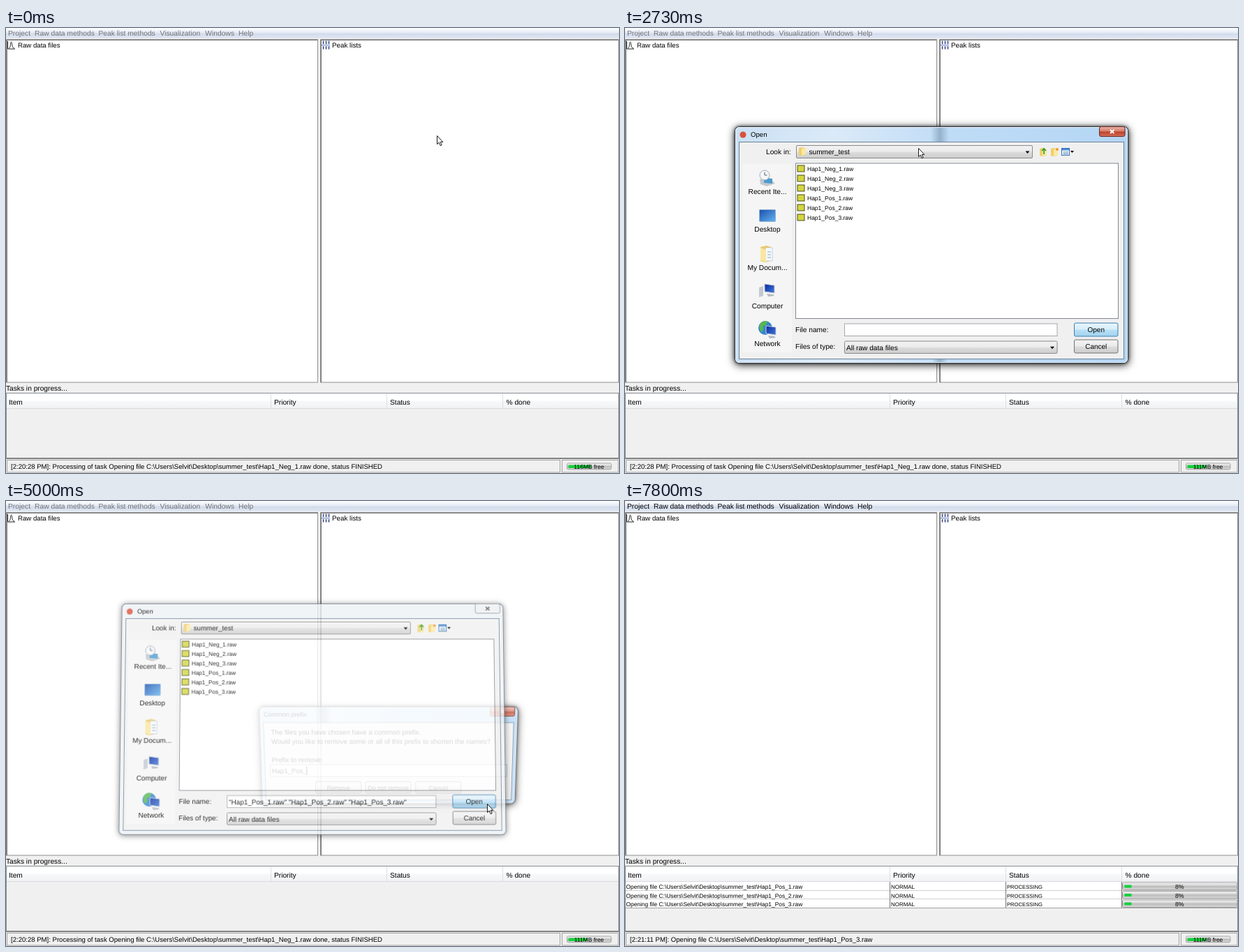
Animation, 878 px wide and 638 px high, one loop 8 s. Source, as an HTML page:

```html
<!DOCTYPE html>
<html lang="en">
<head>
<meta charset="utf-8">
<title>Importing raw data</title>
<style>
html, body { margin: 0; width: 100%; height: 100%; overflow: hidden; background: #f0f0f0; }
#stage { position: absolute; inset: 0; overflow: hidden; contain: strict; }
svg { position: absolute; left: 0; top: 0; width: 878px; height: 638px; display: block; }
text { font-family: "Liberation Sans", Arial, sans-serif; white-space: pre; text-rendering: geometricPrecision; }
.mid { text-anchor: middle; }
.frame { filter: drop-shadow(0 0 2px rgba(0,0,0,.6)) drop-shadow(0 2px 6px rgba(0,0,0,.8)); }

/* Hard switches: shared clock, one keyframe set each */
.sw, #open .frame { animation: 8s step-end infinite; }
#open .frame { animation-name: unlit; }
.ink { animation-name: ink; }
.menu { animation-name: menu; }
.hover { animation-name: hover; }
.selA { animation-name: selA; }
.selB { animation-name: selB; }
.one { animation-name: one; }
.many { animation-name: many; }
.caretA { animation-name: caretA; }
.caretB { animation-name: caretB; }
.inactive { animation-name: inactive; }
.before { animation-name: before; }
.after { animation-name: after; }
.p0 { animation-name: p0; }
.p4 { animation-name: p4; }
.p8 { animation-name: p8; }
.m116 { animation-name: m116; }
.m114 { animation-name: m114; }
.m111 { animation-name: m111; }
.m110 { animation-name: m110; }
@keyframes unlit { 61.625% { filter: drop-shadow(0 1px 4px rgba(0,0,0,.6)) } 100% { filter: drop-shadow(0 1px 4px rgba(0,0,0,.6)) } }
@keyframes ink { 0% { fill: #737376 } 10.875% { fill: #000 } 21.625% { fill: #737376 } 81.625% { fill: #000 } }
@keyframes menu { 0% { opacity: 0 } 10.875% { opacity: 1 } 21.625% { opacity: 0 } }
@keyframes hover { 0% { opacity: 0 } 16.75% { opacity: 1 } 21.625% { opacity: 0 } }
@keyframes selA { 0% { opacity: 0 } 39.125% { opacity: 1 } 61.625% { opacity: 0 } }
@keyframes selB { 0% { opacity: 0 } 44.125% { opacity: 1 } 61.625% { opacity: 0 } }
@keyframes one { 0% { opacity: 0 } 39.125% { opacity: 1 } 44.125% { opacity: 0 } }
@keyframes many { 0% { opacity: 0 } 44.125% { opacity: 1 } }
@keyframes caretA { 0% { opacity: 1 } 30.625% { opacity: 0 } 36.875% { opacity: 1 } 39.125% { opacity: 0 } }
@keyframes caretB { 0% { opacity: 1 } 68.75% { opacity: 0 } 75% { opacity: 1 } }
@keyframes inactive { 0% { opacity: 0 } 61.625% { opacity: 1 } }
@keyframes before { 0% { opacity: 1 } 81.625% { opacity: 0 } }
@keyframes after { 0% { opacity: 0 } 81.625% { opacity: 1 } }
@keyframes p0 { 0% { opacity: 1 } 93.375% { opacity: 0 } }
@keyframes p4 { 0% { opacity: 0 } 93.375% { opacity: 1 } 96.625% { opacity: 0 } }
@keyframes p8 { 0% { opacity: 0 } 96.625% { opacity: 1 } }
@keyframes m116 { 0% { opacity: 1 } 23.375% { opacity: 0 } }
@keyframes m114 { 0% { opacity: 0 } 23.375% { opacity: 1 } 29.125% { opacity: 0 } }
@keyframes m111 { 0% { opacity: 0 } 29.125% { opacity: 1 } 74.625% { opacity: 0 } 96.625% { opacity: 1 } }
@keyframes m110 { 0% { opacity: 0 } 74.625% { opacity: 1 } 96.625% { opacity: 0 } }

/* Windows swing in and out */
#open { transform-origin: 439px 311px; animation: open 8s linear infinite; }
@keyframes open {
  0%, 23.75% { opacity: 0; transform: perspective(1000px) translateY(0) scale(.95) rotateX(0deg); }
  25% { opacity: .96; transform: perspective(1000px) translateY(-.5px) scale(.985) rotateX(0deg); }
  26.625%, 61.625% { opacity: 1; transform: perspective(1000px) translateY(0) scale(1) rotateX(0deg); }
  62.5% { opacity: .8; transform: perspective(1000px) translateY(.5px) scale(.977) rotateX(2.7deg); }
  65%, 100% { opacity: 0; transform: perspective(1000px) translateY(2px) scale(.915) rotateX(8deg); }
}
#prefix { transform-origin: 548px 367px; animation: prefix 8s linear infinite; }
@keyframes prefix {
  0%, 61.625% { opacity: 0; transform: perspective(1000px) translateY(-3px) scale(.92) rotateX(-16deg); }
  62.5% { opacity: .75; transform: perspective(1000px) translateY(-2px) scale(.952) rotateX(-10deg); }
  64.125%, 80.875% { opacity: 1; transform: perspective(1000px) translateY(0) scale(1) rotateX(0deg); }
  83.75%, 100% { opacity: 0; transform: perspective(1000px) translateY(2px) scale(.915) rotateX(8deg); }
}
.haze { animation: haze 8s linear infinite; }
@keyframes haze { 0%, 24% { opacity: .4 } 25% { opacity: .28 } 26.625%, 100% { opacity: 0 } }

#cursor { width: 10px; height: 16px; animation: travel 8s cubic-bezier(.4,.1,.6,.9) infinite, leave 8s step-end infinite; }
@keyframes leave { 0% { opacity: 1 } 90% { opacity: 0 } }
@keyframes travel {
  0%, .8% { transform: translate(617px,154px); }
  8.375%, 13.375% { transform: translate(84px,7px); }
  19.125%, 25.875% { transform: translate(83px,24px); }
  34.125%, 35% { transform: translate(420px,172px); }
  38.375%, 40.875% { transform: translate(290px,238px); }
  44.125%, 45.875% { transform: translate(281px,274px); }
  55.875%, 59.5% { transform: translate(751px,449px); }
  61.625%, 68.375% { transform: translate(689px,434px); }
  77.5%, 79.125% { transform: translate(529px,432px); }
  80.875%, 86.625% { transform: translate(533px,418px); }
  89.125%, 100% { transform: translate(464px,589px); }
}
</style>
</head>
<body>
<div id="stage">
<svg id="main">
  <defs>
    <linearGradient id="bar" x2="0" y2="1"><stop stop-color="#fff"/><stop offset=".45" stop-color="#e4eaf5"/><stop offset=".55" stop-color="#d3dbeb"/><stop offset="1" stop-color="#e0e7f3"/></linearGradient>
    <linearGradient id="head" x2="0" y2="1"><stop stop-color="#fff"/><stop offset=".45" stop-color="#fff"/><stop offset=".55" stop-color="#f7f8fa"/><stop offset="1" stop-color="#f1f2f4"/></linearGradient>
    <linearGradient id="grey" x2="0" y2="1"><stop stop-color="#f3f3f3"/><stop offset=".49" stop-color="#ebebeb"/><stop offset=".51" stop-color="#dddddd"/><stop offset="1" stop-color="#cdcdcd"/></linearGradient>
    <linearGradient id="blue" x2="0" y2="1"><stop stop-color="#eaf6fd"/><stop offset=".49" stop-color="#d5edfb"/><stop offset=".51" stop-color="#b8e0f6"/><stop offset="1" stop-color="#a2d2ee"/></linearGradient>
    <linearGradient id="track" x2="0" y2="1"><stop stop-color="#f4f4f4"/><stop offset=".4" stop-color="#d6d6d6"/><stop offset=".5" stop-color="#bcbcbc"/><stop offset="1" stop-color="#d8d8d8"/></linearGradient>
    <linearGradient id="red" x2="0" y2="1"><stop stop-color="#e9b3a6"/><stop offset=".48" stop-color="#d67b69"/><stop offset=".52" stop-color="#bd3e29"/><stop offset="1" stop-color="#d2705a"/></linearGradient>
    <linearGradient id="glass"><stop stop-color="#cbe0f5"/><stop offset=".25" stop-color="#dbeaf8"/><stop offset=".55" stop-color="#bfdcf6"/><stop offset="1" stop-color="#b4d6f5"/></linearGradient>
    <linearGradient id="smear"><stop stop-color="#6f8ca8" stop-opacity="0"/><stop offset=".5" stop-color="#6f8ca8" stop-opacity=".55"/><stop offset="1" stop-color="#6f8ca8" stop-opacity="0"/></linearGradient>
    <linearGradient id="screen" x2="1" y2="1"><stop stop-color="#1c4fae"/><stop offset="1" stop-color="#63b4ef"/></linearGradient>
    <linearGradient id="night" x2="1" y2="1"><stop stop-color="#0a2a9c"/><stop offset="1" stop-color="#3f78dc"/></linearGradient>
    <g id="folder"><path d="M0 1 4 0 9 1V11L4 12 0 11Z" fill="#f0cf6c"/><path d="M4 2 10 1V10L4 12Z" fill="#fae9a4"/></g>
    <rect id="file" width="10" height="9" fill="#d3d640" stroke="#4a4d18"/>
  </defs>
</svg>
<svg id="prefix"></svg>
<svg id="open"></svg>
<svg id="cursor"><path d="M.5.5V12.6L3.2 10.1 5.2 14.7 7.1 13.8 5.2 9.4H8.8Z" fill="#fff" stroke="#000" stroke-width=".9"/></svg>
</div>

<script>
const rect = (x, y, w, h, fill, stroke = 'none', r = 0) =>
  `<rect x="${x}" y="${y}" width="${w}" height="${h}" fill="${fill}" stroke="${stroke}" rx="${r}"/>`;
const line = (d, color = '#888', w = 1) => `<path d="${d}" fill="none" stroke="${color}" stroke-width="${w}"/>`;
const text = (x, y, s, size = 10.2, attrs = '') => `<text x="${x}" y="${y}" font-size="${size}" ${attrs}>${s}</text>`;
const mid = (x, y, s, size) => text(x, y, s, size, 'class="mid"');
const sw = (name, inner) => `<g class="sw ${name}">${inner}</g>`;
const use = (id, x, y) => `<use href="#${id}" x="${x}" y="${y}"/>`;
const draw = (id, parts) => document.getElementById(id).insertAdjacentHTML('beforeend', parts.join(''));
const button = (x, y, w, h, label, size, hot) =>
  rect(x, y, w, h, hot ? 'url(#blue)' : 'url(#grey)', hot ? '#3c7fb1' : '#707070', 2) +
  mid(x + w / 2, y + h / 2 + 3.6, label, size);
const combo = (x, y, w, h) => rect(x, y, w, h, 'url(#grey)', '#8a8a8a', 1.5) +
  `<path d="M${x + w - 10} ${y + h / 2 - 1}h6l-3 3.5z"/>`;

const dir = 'C:\\Users\\Selvit\\Desktop\\summer_test\\';
const raw = (kind, n) => `Hap1_${kind}_${n}.raw`;

// Main window
const menus = [[3, 'Project'], [41, 'Raw data methods'], [132.5, 'Peak list methods'],
  [220.5, 'Visualization'], [285.3, 'Windows'], [333, 'Help']];
const items = ['Raw data import', 'Raw data export', 'Order raw data files', 'Filtering', 'Peak detection'];
const columns = [[4, 'Item'], [384, 'Priority'], [550, 'Status'], [716.5, '% done']];

// Sunken pane: pale outer edge, dark inner edge
const panel = (x, w) => rect(x + .5, 16.5, w, 491.5, '#fff', '#8f8f8f') +
  line(`M${x + 1.3} 508V17.2H${x + w}`, '#626262');

const taskRow = i => {
  const y = 546 + i * 12.5;
  return rect(1, y, 876, 12.5, '#fff') + line(`M1 ${y + 12.5}H877`, '#a0a0a0') +
    text(1.5, y + 10, `Opening file ${dir}${raw('Pos', i + 1)}`, 8.4) +
    text(381, y + 10, 'NORMAL', 7.95) + text(547, y + 10, 'PROCESSING', 7.65) +
    rect(712.5, y + 1, 164.5, 10.5, 'url(#track)', '#a2a2a2', 2) +
    sw('p8', rect(715.5, y + 4.5, 10, 4, '#12d23a')) +
    [0, 4, 8].map(p => sw('p' + p, text(788, y + 10, p + '%', 8.7))).join('');
};

const memory = n => sw('m' + n,
  rect(805.5, 626.5, n - 84, 4.5, '#18cf3c') + mid(835, 631.8, n + 'MB free', 8.5));

draw('main', [
  rect(0, 0, 878, 638, '#f0f0f0'),
  rect(0, 0, 878, 15, 'url(#bar)'),
  sw('menu', rect(39.5, 1.5, 88.5, 12.5, '#d9dfea', '#555', 2)),
  sw('ink', menus.map(([x, s]) => text(x, 11, s, 10.3)).join('')),
  panel(0, 446), panel(450, 427),
  line('M2.5 19V30H13', '#222'), line('M4 29C7 29 6 20 7.5 20S8 29 12 29', '#222'),
  text(17, 28.2, 'Raw data files', 9.65),
  line('M452 24.5H464', '#5f7fd0'),
  line('M454.5 18.5V23M458.5 18.5V23M462.5 18.5V23M454.5 26V30.5M458.5 26V30.5M462.5 26V30.5', '#2b3b78', 1.4),
  text(467, 28.2, 'Peak lists', 9.8),
  text(0, 520.4, 'Tasks in progress...'),
  rect(.5, 523.5, 877, 93, '#f0f0f0', '#8a8e94'),
  rect(1, 524, 876, 21, 'url(#head)'), line('M1 545.5H877', '#d8dade'),
  line('M379.5 524V545M545.5 524V545M711.5 524V545', '#dddfe3'),
  columns.map(([x, s]) => text(x, 539.8, s)).join(''),
  sw('after', [0, 1, 2].map(taskRow).join('') + line('M379.5 546V583M545.5 546V583M711.5 546V583', '#777')),
  line('M0 617.5H878', '#777'),
  rect(1.5, 619.5, 792, 17.5, '#f0f0f0', '#a3a3a3'), rect(796.5, 619.5, 80.5, 17.5, '#f0f0f0', '#a3a3a3'),
  sw('before', text(7, 632, `[2:20:28 PM]: Processing of task Opening file ${dir}${raw('Neg', 1)} done, status FINISHED`, 9.57)),
  sw('after', text(7, 632, `[2:21:11 PM]: Opening file ${dir}${raw('Pos', 3)}`, 9.57)),
  rect(803.5, 624, 63.5, 9, 'url(#track)', '#a8a8a8', 2),
  [116, 114, 111, 110].map(memory).join(''),
  sw('menu',
    rect(38.5, 15.5, 129.5, 89, '#f0f0f0', '#979797') +
    sw('hover', rect(40.5, 18.5, 125.5, 16, '#ebf0f7', '#b4cfec', 2)) +
    items.map((s, i) => text(64.5, 29.8 + i * 17.2, s, 10.05)).join('') +
    '<path d="M161 75l3.5 2.7-3.5 2.7zM161 92l3.5 2.7-3.5 2.7z"/>')
]);

// Glass window with a title, close button and content area
const frame = (x, y, w, h, side, top, foot, fades) => {
  const close = (fill, cross, edge) => rect(x + w - 41.5, y + .5, 36.5, 14, fill, edge, 2.5) +
    line(`M${x + w - 26} ${y + 5}l5.5 5M${x + w - 20.5} ${y + 5}l-5.5 5`, cross, 1.8);
  const body = (fill, edge) => rect(x + .5, y + .5, w - 1, h - 1, fill, edge, 6);
  return `<g class="frame">${body('url(#glass)', '#2d3640')}</g>` +
    rect(x + 1.5, y + 1.5, w - 3, h - 3, 'none', '#f1f8ff', 5) +
    rect(438, y + 2, 26, top - 2, 'url(#smear)') + rect(440, y + h - foot, 22, foot - 2, 'url(#smear)') +
    (fades ? `<g class="haze">${body('#4f6272', 'none')}</g>` : '') +
    close('url(#red)', '#fff', '#6b2a22') +
    (fades ? sw('inactive', body('#edf1f4', '#6c7680') + close('#eceff2', '#666', '#8b929a')) : '') +
    rect(x + side, y + top, w - side * 2, h - top - foot, '#f0f0f0', '#6d8299');
};

// File dialog
const rowY = i => 202 + i * 14;
const files = ['Neg', 'Pos'].flatMap(k => [1, 2, 3].map(n => raw(k, n)));
const fileRow = (s, i) => use('file', 247, rowY(i) - 5) + text(261, rowY(i) + 3.2, s, 8.5);
const picked = i => rect(245, rowY(i) - 7, 83, 14, '#3399ff') + use('file', 247, rowY(i) - 5) +
  text(261, rowY(i) + 3.2, files[i], 8.5, 'fill="#fff"');
const places = ['Recent Ite...', 'Desktop', 'My Docum...', 'Computer', 'Network'];
const monitor = (x, y) => `<path d="M${x} ${y}l14 2v11l-14-2z" fill="url(#night)" stroke="#c6ccd4"/>` +
  `<path d="M${x + 3} ${y + 14}l9 1 2 2-9 1z" fill="#b4b9c0"/>`;

draw('open', [
  frame(157, 141, 564, 340, 6.5, 22.5, 6.5, true),
  '<circle cx="169" cy="153" r="4.5" fill="#d8503c"/>',
  text(180, 155.6, 'Open', 9.6),
  rect(168, 195, 71, 270, '#f5f5f5'),
  text(202, 181, 'Look in:'),
  combo(245.5, 168.5, 338, 18), use('folder', 249, 171), text(263.5, 181, 'summer_test', 10.1),
  use('folder', 594, 172), line('M600 181V173M597 176l3-3 3 3', '#2f9a2f', 1.6),
  use('folder', 610, 172), '<circle cx="619" cy="174" r="2" fill="#ee9a3a"/>',
  rect(625.5, 172.5, 11, 10, '#fff', '#2f6fb4'), rect(626, 173, 10, 2.5, '#4b8ed6'),
  line('M627.5 178H635M627.5 180.5H635', '#3d6fa8', 1.2), '<path d="M638 176h5l-2.5 3z"/>',
  // Places
  '<path d="M193 217l14-2 8 8-12 4-9-3z" fill="#c3c8ce"/><path d="M199 215l12 1v7l-12-1z" fill="#4a9bd0"/>',
  '<circle cx="200" cy="211" r="7" fill="#f4f6f8" stroke="#a3adb8"/>', line('M200 206.5V211H203.5', '#567'),
  rect(192.5, 260.5, 23, 17, 'url(#screen)', '#8fb0d4', 1),
  '<path d="M194 314l9-2 6 2v20l-9 2-6-2z" fill="#ecc867"/><path d="M201 315h10v19h-10z" fill="#f5f9fc" stroke="#b8c4d0" stroke-width=".7"/><path d="M194 315l8 3v18l-8-3z" fill="#f9e6a0"/>',
  line('M204 321H209M204 325H209M204 329H209', '#84a8c8'),
  '<path d="M192 372l6-2v14l-6 2z" fill="#c2c8d0"/>', monitor(200, 367),
  '<circle cx="201" cy="430" r="10" fill="#3586cf"/><path d="M193 425q5-7 11-4-1 6-6 6 1 6-2 9-5-4-3-11z" fill="#57b84e"/>', monitor(202, 427),
  places.map((s, i) => mid(204, 237.8 + i * 54.6, s)).join(''),
  // List
  rect(244.5, 194, 462, 222.5, '#fff', '#82878f'),
  files.map(fileRow).join(''),
  sw('selA', picked(3)), sw('selB', picked(4) + picked(5)),
  text(244, 436.3, 'File name:'), text(244, 459.5, 'Files of type:', 10.1),
  rect(314.5, 424, 304.5, 17.5, '#fff', '#a3a7ad'),
  sw('caretA', line('M317.5 426.5V438.5', '#000')),
  sw('one', text(317, 436.8, files[3], 10.1)),
  sw('many', text(317, 436.8, files.slice(3).map(s => `"${s}"`).join(' '), 10.08)),
  combo(314.5, 449, 304.5, 17.5), text(317, 461.7, 'All raw data files', 10.15),
  button(643.5, 423, 62.5, 19, 'Open', 10, true), button(643.5, 447, 62.5, 19, 'Cancel', 10)
]);

// Prefix dialog
draw('prefix', [
  frame(355.5, 293, 385, 148.5, 6, 24, 6, false),
  text(362, 308.2, 'Common prefix', 9.45),
  text(372, 335.3, 'The files you have chosen have a common prefix.'),
  text(372, 349.3, 'Would you like to remove some or all of this prefix to shorten the names?'),
  text(372, 377.3, 'Prefix to remove:'),
  rect(369.5, 381, 357, 18, '#fff', '#a3a7ad'),
  text(372, 394.3, 'Hap1_Pos_', 10),
  sw('caretB', line('M424.5 383.5V396.5', '#000')),
  button(437.5, 407, 69, 18, 'Remove', 9.4), button(513, 407, 69, 18, 'Do not remove', 9.45),
  button(588.8, 407, 69, 18, 'Cancel', 9.3)
]);
</script>
</body>
</html>
```
